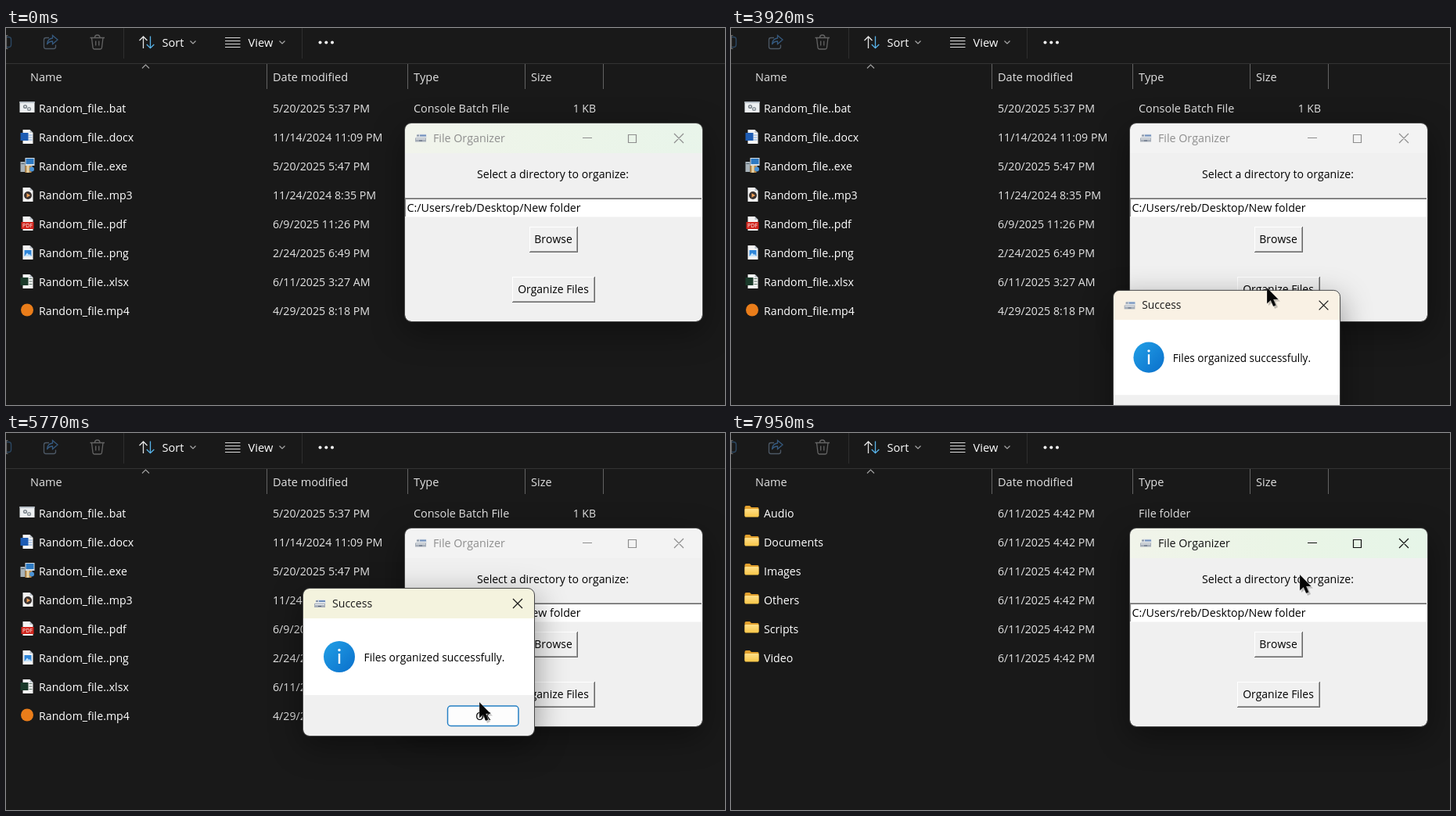
Write an HTML page that moves like this. It is 919 by 482 pixels and loops after 8000 ms.

```html
<!DOCTYPE html>
<html lang="en">
<head>
<meta charset="utf-8">
<title>File organizer demo</title>
<style>
  html, body { margin: 0; width: 100%; height: 100%; overflow: hidden; background: #191919; }
  svg { display: block; width: 100vw; height: 100vh; }
  text { font-family: "Open Sans", "Noto Sans", sans-serif; font-size: 14.2px; font-kerning: none; white-space: pre; }
  .line { fill: none; stroke-width: 1.2; }
  .window { filter: drop-shadow(0 12px 20px rgba(0, 0, 0, .4)); }
  .edge { fill: none; stroke: #474747; }
</style>
</head>
<body>
<svg id="stage" viewBox="0 0 919 482" xmlns="http://www.w3.org/2000/svg">
  <defs>
    <linearGradient id="mint"><stop stop-color="#f1f4ea"/><stop offset=".5" stop-color="#eaf5e6"/><stop offset="1" stop-color="#e6f5e8"/></linearGradient>
    <linearGradient id="info" x2="1" y2="1"><stop stop-color="#22a0e6"/><stop offset="1" stop-color="#0a6fcb"/></linearGradient>
    <linearGradient id="folder" x2="0" y2="1"><stop stop-color="#ffe08a"/><stop offset="1" stop-color="#f9c647"/></linearGradient>
    <clipPath id="mainClip"><rect x="510" y="122" width="380" height="253" rx="8"/></clipPath>
    <clipPath id="boxClip"><rect width="295" height="188" rx="8"/></clipPath>
  </defs>
  <rect width="919" height="482" fill="#191919"/>
  <g id="toolbar"></g>
  <g id="header"></g>
  <g id="files"></g>
  <g id="folders"></g>
  <g id="main" class="window"></g>
  <g id="box" class="window"></g>
  <circle id="press" r="15.5" fill="#f7e41c" fill-opacity=".72"/>
  <g id="pointer">
    <path d="M2 3V23L7 19L10 27L14 25L11 17.500H17Z" fill="#000" opacity=".22"/>
    <path d="M0 0V20.500L4.700 16.300L8.100 24L11.600 22.500L8.400 15H14.700Z" fill="#060606" stroke="#fff" stroke-opacity=".35" stroke-width=".6"/>
  </g>
</svg>
<script>
const $ = id => document.getElementById(id);
const label = (x, y, s, fill, size = 14.2, anchor = 'start') =>
  `<text x="${x}" y="${y}" fill="${fill}" text-anchor="${anchor}" style="font-size:${size}px">${s}</text>`;
const rect = (x, y, w, h, fill, more = '') =>
  `<rect x="${x}" y="${y}" width="${w}" height="${h}" fill="${fill}" ${more}/>`;
const line = (d, color, width = 1.2) =>
  `<path class="line" d="${d}" stroke="${color}" style="stroke-width:${width}"/>`;
const disc = (x, y, r, fill) => `<circle cx="${x}" cy="${y}" r="${r}" fill="${fill}"/>`;
const at = (x, y, s) => `<g transform="translate(${x} ${y})">${s}</g>`;

// Explorer chrome
const chevron = x => line(`M${x} 16.500l3.500 3.500l3.500-3.500`, '#a8a8a8');
$('toolbar').innerHTML =
  line('M0 11.500H3Q6.500 11.500 6.500 14.500V21.500Q6.500 24.500 3 24.500H0', '#2c4863', 1.4) +
  line('M-1 9.500H2.500M.5 9.500V26.500M-1 26.500H2.500', '#6a6a6a') +
  line('M55 12.500H51Q48.500 12.500 48.500 15V24Q48.500 26.500 51 26.500H61Q63.500 26.500 63.500 24V21.500', '#4d5966', 1.3) +
  line('M59.500 9.500L66 15L59.500 20.500V17Q54.500 17 52.500 21Q53 13.500 59.500 13Z', '#35597f', 1.3) +
  line('M107.500 12.500H126M113.500 12.500Q113.500 9 116.750 9Q120 9 120 12.500M109.500 12.500L111 25Q111.200 27 113 27H120.500Q122.300 27 122.500 25L124 12.500M114.700 16.500V22.500M118.800 16.500V22.500', '#646464', 1.3) +
  rect(150, 0, 1, 39, '#2f2f2f') + rect(378, 0, 1, 39, '#2f2f2f') +
  line('M175.500 26V11M170.500 16L175.500 11L180.500 16', '#e4e4e4', 1.3) +
  line('M184.500 10.500V25.500M179.800 21L184.500 25.700L189.300 21', '#58b4ea', 1.3) +
  label(199.5, 24, 'Sort', '#fff', 14.6) + chevron(235.5) +
  line('M280 12.500H299.500M280 16.500H299.500M280 20.500H299.500M280 24.500H299.500', '#d8d8d8') +
  label(309.5, 24, 'View', '#fff', 14.6) + chevron(349.5) +
  [401.5, 409.3, 417].map(x => disc(x, 18.5, 2, '#fff')).join('') +
  rect(0, 45, 919, 1, '#333');

$('header').innerHTML =
  line('M174 51.500L178.500 47L183 51.500', '#a0a0a0') +
  [333, 513, 663, 763].map(x => rect(x, 46, 1, 32, '#636363')).join('') +
  [['Name', 31], ['Date modified', 341], ['Type', 521], ['Size', 671]]
    .map(([s, x]) => label(x, 68, s, '#e2e2e2', 14.5)).join('');

// File list; icons are drawn on a 20 by 20 tile
const page = '<path d="M4 1H13L17 5V19H4Z" fill="#f4f4f4"/><path d="M13 1V5H17Z" fill="#b9c0c8"/>';
const icons = {
  bat: rect(0, 2, 19, 14, '#eceff1') + rect(0, 2, 19, 2, '#b8c0c7') +
    disc(7, 8.5, 2.6, '#7d868d') + disc(7, 8.5, 1, '#fff') + disc(12, 11.5, 2.6, '#8e979d') + disc(12, 11.5, 1, '#fff'),
  docx: page + line('M11 8H16M11 11H16M11 14H16', '#7aa7de', 1) + rect(1, 5, 10, 10, '#1e5cb3'),
  exe: rect(7, 0, 12, 10, '#d5dde3') + rect(8, 1, 10, 7, '#2c79c2') + rect(10, 10, 6, 2, '#9aa6ae') +
    rect(1, 5, 6, 13, '#a8b3ba') + rect(2, 7, 4, 1, '#50606c') +
    rect(7, 10, 8, 9, '#b98a4a') + rect(9, 10, 3, 9, '#e8d5a8') + disc(15.5, 14.5, 3, '#4a93d6'),
  mp3: page + disc(10.5, 11, 5, '#3a3230') + '<path d="M9 8.200V13.800L13.600 11Z" fill="#f0a058"/>',
  pdf: page + rect(2, 8, 16, 9, '#d0251d') + label(10, 15.2, 'PDF', '#fff', 7, 'middle'),
  png: page + rect(6, 7, 9, 8, '#2f86d9') + '<path d="M6 15L9.500 10.500L12 13L13 12L15 15Z" fill="#bfe0fa"/>',
  xlsx: page + line('M12 6.500H16M12 10H16M12 13.500H16', '#5d7567', 1) + rect(1, 5, 10, 10, '#1b3a2a'),
  mp4: disc(9.5, 9.5, 8, '#ea7d1a'),
  folder: '<path d="M0 3Q0 1 2 1H6.500L8.500 3H16.500Q18 3 18 4.500V14H0Z" fill="#e2a02d"/>' +
    '<path d="M0 6Q0 5 1 5H17Q18 5 18 6V14Q18 15.500 16.500 15.500H1.500Q0 15.500 0 14Z" fill="url(#folder)"/>'
};
const row = (i, icon, name, date, type = '') =>
  at(17.500, 92 + 37 * i, icon) + label(42, 108 + 37 * i, name, '#fff') +
  label(341, 108 + 37 * i, date, '#e4e4e4') + label(521, 108 + 37 * i, type, '#e4e4e4', 14.4);

$('files').innerHTML = [
  ['.bat', '5/20/2025 5:37 PM', 'Console Batch File'], ['.docx', '11/14/2024 11:09 PM'],
  ['.exe', '5/20/2025 5:47 PM'], ['.mp3', '11/24/2024 8:35 PM'], ['.pdf', '6/9/2025 11:26 PM'],
  ['.png', '2/24/2025 6:49 PM'], ['.xlsx', '6/11/2025 3:27 AM'], ['mp4', '4/29/2025 8:18 PM']
].map(([ext, date, type], i) =>
  row(i, icons[ext.replace('.', '')], 'Random_file.' + ext, date, type)).join('') +
  label(754, 108, '1 KB', '#e4e4e4', 14, 'end');

$('folders').innerHTML = ['Audio', 'Documents', 'Images', 'Others', 'Scripts', 'Video']
  .map((name, i) => row(i, icons.folder, name, '6/11/2025 4:42 PM', 'File folder')).join('');

// Windows
const appIcon = '<path d="M3 0H14L15 5H1Z" fill="#dfe3e8"/>' + rect(2, 1, 3, 2, '#8b97a8') +
  rect(6, 1, 8, 2, '#6f8fbd') + rect(0, 5, 14, 5, '#a5adb8') + rect(1, 6, 12, 1, '#f2f4f6') + rect(5, 8, 4, 1, '#59647a');
const cross = (x, y) => `M${x - 6} ${y - 6}l12 12m0 -12l-12 12`;
const edge = (x, y, w, h) =>
  `<rect class="edge" x="${x - .5}" y="${y - .5}" width="${w + 1}" height="${h + 1}" rx="8.5"/>`;
const button = (x, y, w, h, s) =>
  rect(x, y, w, h, '#696969') + rect(x, y, w - 1, h - 1, '#fff') +
  rect(x + 1, y + 1, w - 2, h - 2, '#a0a0a0') + rect(x + 1, y + 1, w - 3, h - 3, '#f0f0f0') +
  label(x + w / 2 - .5, y + 21, s, '#000', 13.95, 'middle');

$('main').innerHTML = '<g clip-path="url(#mainClip)">' +
  rect(510, 122, 380, 254, '#f0f0f0') + rect(510, 122, 380, 38, '#f3f3f3') +
  rect(510, 122, 380, 38, 'url(#mint)', 'id="tint"') + at(523, 135.5, appIcon) +
  '<g id="caption">' + label(546, 146, 'File Organizer', 'currentColor', 14.25) +
  line('M737 140.500H749M795.500 136.500H805.500V146.500H795.500Z' + cross(860, 141), 'currentColor') + '</g>' +
  label(699, 191.5, 'Select a directory to organize:', '#000', 14.1, 'middle') +
  rect(510, 217, 380, 24.5, '#fff') + rect(510, 217, 379, 1, '#a0a0a0') + rect(510, 218, 379, 1, '#696969') +
  rect(510, 217, 1, 24, '#8c8c8c') +
  label(512.5, 235, 'C:/Users/reb/Desktop/New folder', '#000', 14.25) +
  button(669, 254, 62, 33, 'Browse') + button(647, 318, 106, 33, 'Organize Files') + '</g>' +
  edge(510, 122, 380, 253);

$('box').innerHTML = '<g clip-path="url(#boxClip)">' +
  rect(0, 0, 295, 188, '#fff') + rect(0, 0, 295, 38, '#f8f2e2', 'id="boxBar"') +
  rect(0, 136, 295, 52, '#f0f0f0') + at(14, 14, appIcon) +
  label(37, 24, 'Success', '#1a1a1a', 14.1) + line(cross(274, 19), '#1a1a1a', 1.3) +
  disc(46, 87, 20, 'url(#info)') + disc(46, 78.5, 1.7, '#fff') + rect(44.8, 83, 2.4, 13, '#fff') +
  label(77.5, 93, 'Files organized successfully.', '#000', 13.85) +
  rect(184.5, 150, 90.5, 25.5, '#fdfdfd', 'rx="4" stroke="#2680c4" stroke-width="1.5"') +
  label(229.8, 168, 'OK', '#000', 13.7, 'middle') + '</g>' + edge(0, 0, 295, 188);

// Motion
const LOOP = 8000;
const path = [
  [760, 800, 490], [790, 799, 478], [1000, 774, 408], [1220, 735, 342], [1400, 711, 309], [1540, 701, 297],
  [1590, 701, 297], [1800, 697, 280], [2020, 696, 268], [2450, 696, 268], [2770, 690, 308], [3050, 685, 326],
  [3220, 685, 326], [3390, 685, 332], [3980, 685, 332], [4390, 628, 344], [4470, 628, 344],
  [4700, 605, 328], [5000, 568, 295], [5240, 547, 274], [5430, 522, 209], [5500, 522, 209], [5740, 605, 344],
  [6330, 605, 344], [6600, 606, 275], [6930, 609, 200], [7060, 620, 171], [7220, 607, 149],
  [7360, 593, 155], [7540, 645, 150], [7750, 699, 155], [7950, 727, 181]
];
const clamp = v => Math.min(1, Math.max(0, v));
const span = (t, a, b) => clamp((t - a) / (b - a));
const mix = (a, b, p) => a + (b - a) * p;
const within = (t, a, b) => t >= a && t < b;
const show = (id, on) => $(id).setAttribute('visibility', on ? 'visible' : 'hidden');

function pointAt(t) {
  const i = path.findIndex(k => k[0] > t);
  if (i === 0) return path[0].slice(1);
  if (i < 0) return path[path.length - 1].slice(1);
  const [t0, x0, y0] = path[i - 1], [t1, x1, y1] = path[i], p = span(t, t0, t1);
  return [mix(x0, x1, p), mix(y0, y1, p)];
}

function draw(t) {
  const [x, y] = pointAt(t);
  show('pointer', t >= 785);
  $('pointer').setAttribute('transform', `translate(${x} ${y})`);
  show('press', within(t, 3650, 3780) || within(t, 4460, 5430) || within(t, 6060, 6180));
  $('press').setAttribute('cx', x - .5);
  $('press').setAttribute('cy', y - .5);

  show('files', t < 5960);
  show('folders', t >= 5960);

  const active = span(t, 6200, 6330);
  $('tint').setAttribute('opacity', t < 70 ? .8 : t < 130 ? .4 : active);
  $('caption').setAttribute('color', active > .5 ? '#111' : '#8e8e8e');

  // The message box follows the pointer while held
  const [hx, hy] = pointAt(Math.min(5430, Math.max(4400, t)));
  const opening = span(t, 3800, 4090), closing = span(t, 6180, 6330);
  const scale = .9 + .1 * (1 - (1 - opening) ** 3) - .08 * closing;
  const drag = span(t, 4470, 5430);
  show('box', opening > 0 && closing < 1);
  $('box').setAttribute('opacity', Math.min(1, opening * 3) * (1 - closing));
  $('box').setAttribute('transform',
    `translate(${hx - 142 + 147.5} ${hy - 10 + 94}) scale(${scale}) translate(-147.5 -94)`);
  $('boxBar').setAttribute('fill', `rgb(${mix(249, 244, drag)} ${mix(241, 243, drag)} ${mix(228, 222, drag)})`);
}

const start = performance.now();
function tick() {
  draw((performance.now() - start) % LOOP);
  requestAnimationFrame(tick);
}
tick();
</script>
</body>
</html>
```
